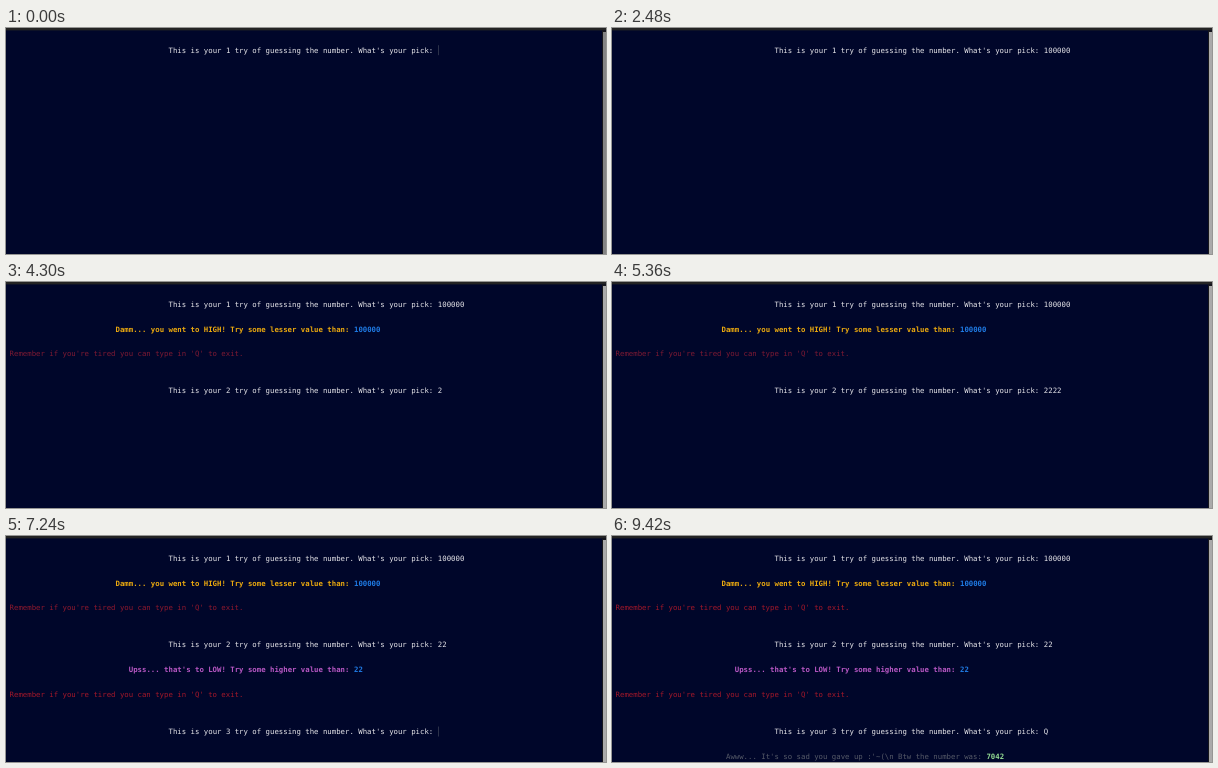
These frames come from a looping animation (600 by 226 pixels, 10 s). An HTML page:

```html
<!DOCTYPE html>
<html lang="en">
<head>
<meta charset="utf-8">
<title>Guess the number</title>
<style>
html, body { margin: 0; width: 100%; height: 100%; overflow: hidden; background: #00062a; }
svg { display: block; }
text {
  font: 7.333px "DejaVu Sans Mono", monospace;
  text-rendering: geometricPrecision;
  white-space: pre;
}
.bold { font-weight: 700; }
</style>
</head>
<body>
<svg id="stage" width="600" height="226" viewBox="0 0 600 226">
  <rect width="600" height="226" fill="#00062a"/>
  <rect width="600" height="2.4" fill="#242424"/>
  <rect x="596" y="2.4" width="4" height="224" fill="#17171c"/>
  <rect id="bar" x="597" y="4" width="3" height="222"/>
</svg>
<script>
const LOOP = 10000;
const LEFT = 3.6, CELL = 4.415, TOP = 24.8, ROW = 12.38;
const WHITE = '#e6e6ea', BLUE = '#1f7ce6', RED = '#a3182a';
const stage = document.getElementById('stage');
const bar = document.getElementById('bar');

function add(tag, attrs) {
  const el = document.createElementNS('http://www.w3.org/2000/svg', tag);
  for (const key in attrs) el.setAttribute(key, attrs[key]);
  stage.appendChild(el);
  return el;
}

function write(row, col, text, fill, bold) {
  const el = add('text', {
    x: LEFT + col * CELL, y: TOP + row * ROW, fill, class: bold ? 'bold' : ''
  });
  el.textContent = text;
  return el;
}

function caret(row) {
  return add('rect', { x: 432, y: 17.2 + row * ROW, width: 1, height: 10, fill: '#2b3149' });
}

const ask = n => `This is your ${n} try of guessing the number. What's your pick: `;
const remind = row => write(row, 0, "Remember if you're tired you can type in 'Q' to exit.", RED);

// Each round: when it appears, and what the input holds from each moment on
const rounds = [
  { at: 0, row: 0, keys: [[1520, '1'], [1820, '10'], [2360, '100'], [2390, '1000'],
                          [2420, '10000'], [2450, '100000']] },
  { at: 2880, row: 7, keys: [[4300, '2'], [4820, '22'], [4850, '222'], [4910, '2222'],
                             [6180, '222'], [6790, '22']] },
  { at: 7210, row: 14, keys: [[8670, 'Q']] }
];
rounds.forEach((r, i) => {
  r.prompt = write(r.row, 36, ask(i + 1), WHITE);
  r.input = write(r.row, 97, '', WHITE);
  r.caret = caret(r.row);
});

const high = [
  write(2, 24, 'Damm... you went to HIGH! Try some lesser value than:', '#eaa90f', true),
  write(2, 78, '100000', BLUE, true)
];
const firstHint = remind(4);
const low = [
  write(9, 27, "Upss... that's to LOW! Try some higher value than:", '#b858c4', true),
  write(9, 78, '22', BLUE, true),
  remind(11)
];
const bye = [
  write(16, 25, "Awww... It's so sad you gave up :'~(\\n Btw the number was:", '#555a68'),
  write(16, 84, '7042', '#93dc93', true)
];
const replies = [[2880, [...high, firstHint]], [7210, low], [9420, bye]];

const show = (el, on) => { el.style.display = on ? '' : 'none'; };

function draw(t) {
  const fade = Math.min(1, Math.max(0, (t - 210) / 270));
  const grey = Math.round(132 + 38 * fade);
  bar.setAttribute('fill', `rgb(${grey},${grey},${grey})`);

  for (const r of rounds) {
    let typed = '';
    for (const [at, value] of r.keys) if (t >= at) typed = value;
    if (r.input.textContent !== typed) r.input.textContent = typed;
    show(r.prompt, t >= r.at);
    show(r.caret, t >= r.at && !typed);
  }
  rounds[0].caret.setAttribute('opacity', 1 - fade);

  for (const [at, parts] of replies) parts.forEach(el => show(el, t >= at));
  firstHint.setAttribute('fill', t < 7210 ? '#7d1a33' : t < 7730 ? '#8f192e' : RED);
}

let start;
function tick(now) {
  if (start === undefined) start = now;
  draw((now - start) % LOOP);
  requestAnimationFrame(tick);
}
draw(0);
requestAnimationFrame(tick);
</script>
</body>
</html>
```
